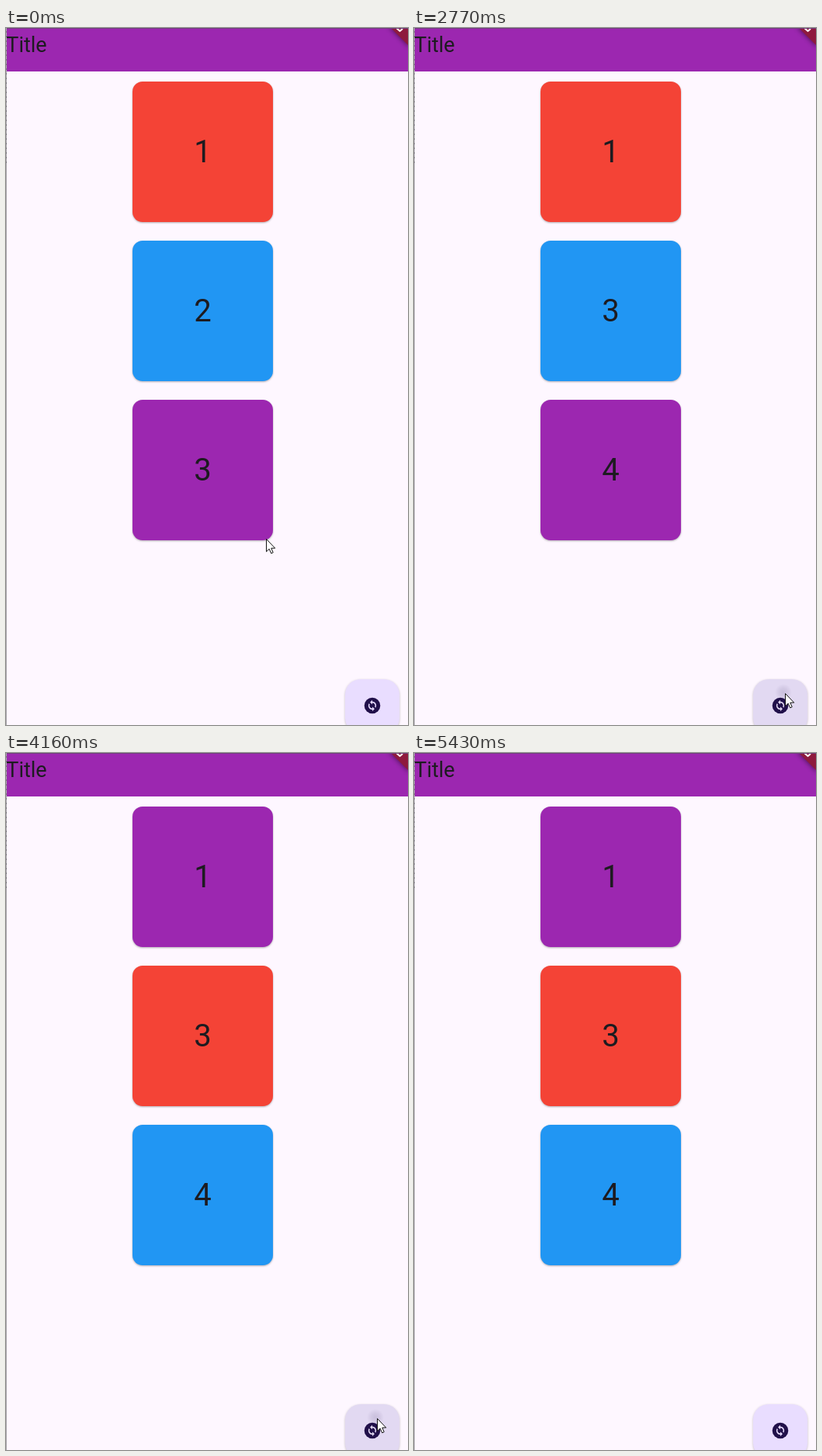
An HTML page for the animation above (5.87 s loop, 518x898 px).

```html
<!DOCTYPE html>
<html lang="en">
<head>
<meta charset="utf-8">
<title>Tiles</title>
<style>
  html, body { margin: 0; width: 100%; height: 100%; overflow: hidden; background: #fef7ff; }
  svg { display: block; width: 518px; height: 898px; }
  text { font-family: Roboto, Arial, sans-serif; fill: #1d1b20; }
  .face { filter: drop-shadow(0 1px 1px rgba(0, 0, 0, .3)); }
  .tile text { font-size: 40px; text-anchor: middle; }
  #fab { filter: drop-shadow(0 1.5px 1.5px rgba(0, 0, 0, .24)); }
</style>
</head>
<body>
<svg viewBox="0 0 518 898">
  <defs>
    <radialGradient id="ink">
      <stop offset="0" stop-color="#21104a" stop-opacity=".13"/>
      <stop offset=".5" stop-color="#21104a" stop-opacity=".08"/>
      <stop offset="1" stop-color="#21104a" stop-opacity="0"/>
    </radialGradient>
    <filter id="soft" x="-50%" y="-50%" width="200%" height="200%"><feGaussianBlur stdDeviation="3"/></filter>
    <clipPath id="bar"><rect width="518" height="56"/></clipPath>
    <clipPath id="fabClip"><rect x="437" y="839" width="70" height="70" rx="20"/></clipPath>
  </defs>

  <rect width="518" height="898" fill="#fef7ff"/>
  <rect width="518" height="56" fill="#9c27b0"/>
  <text x=".3" y="30.7" font-size="27">Title</text>
  <g clip-path="url(#bar)">
    <path d="M493 -2H520V25Z" fill="#000" opacity=".5" filter="url(#soft)"/>
    <path d="M496 0H518V22Z" fill="#8e1a3e"/>
    <path d="M503.5 .5L507.5 4L511 1" fill="none" stroke="#fff" stroke-width="2"/>
  </g>
  <path d="M0 .5H518" stroke="#6f3f7a"/>
  <path d="M.5 0V898" stroke="#aaa5ad"/>
  <path d="M.5 4V178" stroke="#807b84" stroke-dasharray="2 4"/>

  <g id="tiles"></g>

  <rect id="fab" x="437" y="839" width="70" height="70" rx="20"/>
  <circle id="splash" cx="476" cy="856" fill="url(#ink)" clip-path="url(#fabClip)"/>
  <g transform="translate(472 873) scale(1.03) translate(-12 -12)">
    <circle cx="12" cy="12" r="10" fill="#21104a"/>
    <g id="arrows">
      <path id="arrow" d="M12.06 19V17C10.8 17 9.45 16.5 8.46 15.53C6.75 13.82 6.54 11.18 7.82 9.24L8.92 10.34C8.21 11.67 8.39 13.35 9.51 14.47C10.21 15.17 11.13 15.5 12.05 15.48V13.34L14.88 16.17Z"/>
      <use href="#arrow" transform="rotate(180 12 12)"/>
    </g>
  </g>

  <path id="cursor" d="M.5 .5V16.7L4.2 13.2L6.7 18.9L9.2 17.8L6.8 12.2H11.7Z" fill="#fff" stroke="#111"/>
</svg>
<script>
const LOOP = 5870, BEAT = 140, LEAD = 60, LAST = 39;
const RED = '#f44336', BLUE = '#2196f3', PURPLE = '#9c27b0';
const SIZE = 181, TOP = 69, PITCH = 205;
const $ = id => document.getElementById(id);

// Where the pointer comes to rest: beat, x, y
const STOPS = [
  [0, 335, 658], [4, 478, 874], [6, 265, 577], [7, 265, 577], [8, 265, 528],
  [10, 254, 432], [12, 254, 432], [15, 454, 767], [19, 478, 857], [36, 478, 857], [LAST, 482, 900]
];

// A tap either raises one tile's count or swaps two neighbouring colours
const TAPS = [
  { beat: 8, count: 2 }, { beat: 11, count: 1 },
  { beat: 20, swap: 1 }, { beat: 27, swap: 0 }, { beat: 30, swap: 0 }, { beat: 34, swap: 0 }
];

const easeOut = u => 1 - (1 - u) ** 3;

function pointerAt(beat) {
  const i = Math.max(1, STOPS.findIndex(s => s[0] >= beat));
  const [b0, x0, y0] = STOPS[i - 1], [b1, x1, y1] = STOPS[i];
  const k = easeOut((beat - b0) / (b1 - b0));
  return { x: Math.round(x0 + (x1 - x0) * k), y: Math.round(y0 + (y1 - y0) * k) };
}

function stateAt(beat) {
  const colors = [RED, BLUE, PURPLE], counts = [1, 2, 3], glow = [0, 0, 0];
  let splash = 0;
  for (const { beat: start, count, swap } of TAPS) {
    const age = beat - start;
    if (age < 0) break;
    if (count !== undefined) {
      counts[count]++;
      glow[count] = Math.max(0, 1 - age / 2);
    } else {
      if (age < 2) splash = 11 + 4 * age;
      if (age > 0) [colors[swap], colors[swap + 1]] = [colors[swap + 1], colors[swap]];
    }
  }
  return { colors, counts, glow, splash };
}

// Grains that thicken towards the rim of a tile
function sparklePath() {
  let seed = 7, d = '';
  const rnd = () => (seed = seed * 16807 % 2147483647) / 2147483647;
  const mid = SIZE / 2;
  for (let i = 0; i < 9000; i++) {
    const x = 2 + rnd() * (SIZE - 4), y = 2 + rnd() * (SIZE - 4);
    const r = Math.hypot(x - mid, y - mid) / mid;
    if (r < 1.28 && rnd() < (r - .68) * .8) d += `M${x | 0} ${(y | 0) + .5}h1`;
  }
  return d;
}

const grains = sparklePath();
const tiles = [0, 1, 2].map(i => {
  const g = document.createElementNS('http://www.w3.org/2000/svg', 'g');
  g.setAttribute('class', 'tile');
  g.setAttribute('transform', `translate(163 ${TOP + i * PITCH})`);
  g.innerHTML = `
    <rect class="face" width="${SIZE}" height="${SIZE}" rx="13"/>
    <g class="glow">
      <rect width="${SIZE}" height="${SIZE}" rx="13" fill="#606060" opacity=".06"/>
      <path d="${grains}" stroke="#fff" stroke-opacity=".15"/>
    </g>
    <text x="${SIZE / 2}" y="104"></text>`;
  $('tiles').append(g);
  return { face: g.querySelector('.face'), glow: g.querySelector('.glow'), label: g.querySelector('text') };
});

function draw() {
  const t = performance.now() % LOOP;
  const beat = Math.min(LAST, Math.floor((t + LEAD) / BEAT));
  const { x, y } = pointerAt(beat);
  const { colors, counts, glow, splash } = stateAt(beat);
  tiles.forEach((tile, i) => {
    tile.face.setAttribute('fill', colors[i]);
    tile.glow.setAttribute('opacity', glow[i]);
    tile.label.textContent = counts[i];
  });
  const hover = x >= 437 && y >= 839 && y < 898;
  const tint = hover ? '#e2d9f2' : '#e9ddff';
  $('fab').setAttribute('fill', tint);
  $('arrows').setAttribute('fill', tint);
  $('splash').setAttribute('r', splash);
  $('cursor').setAttribute('transform', `translate(${x} ${y})`);
  requestAnimationFrame(draw);
}
draw();
</script>
</body>
</html>
```
